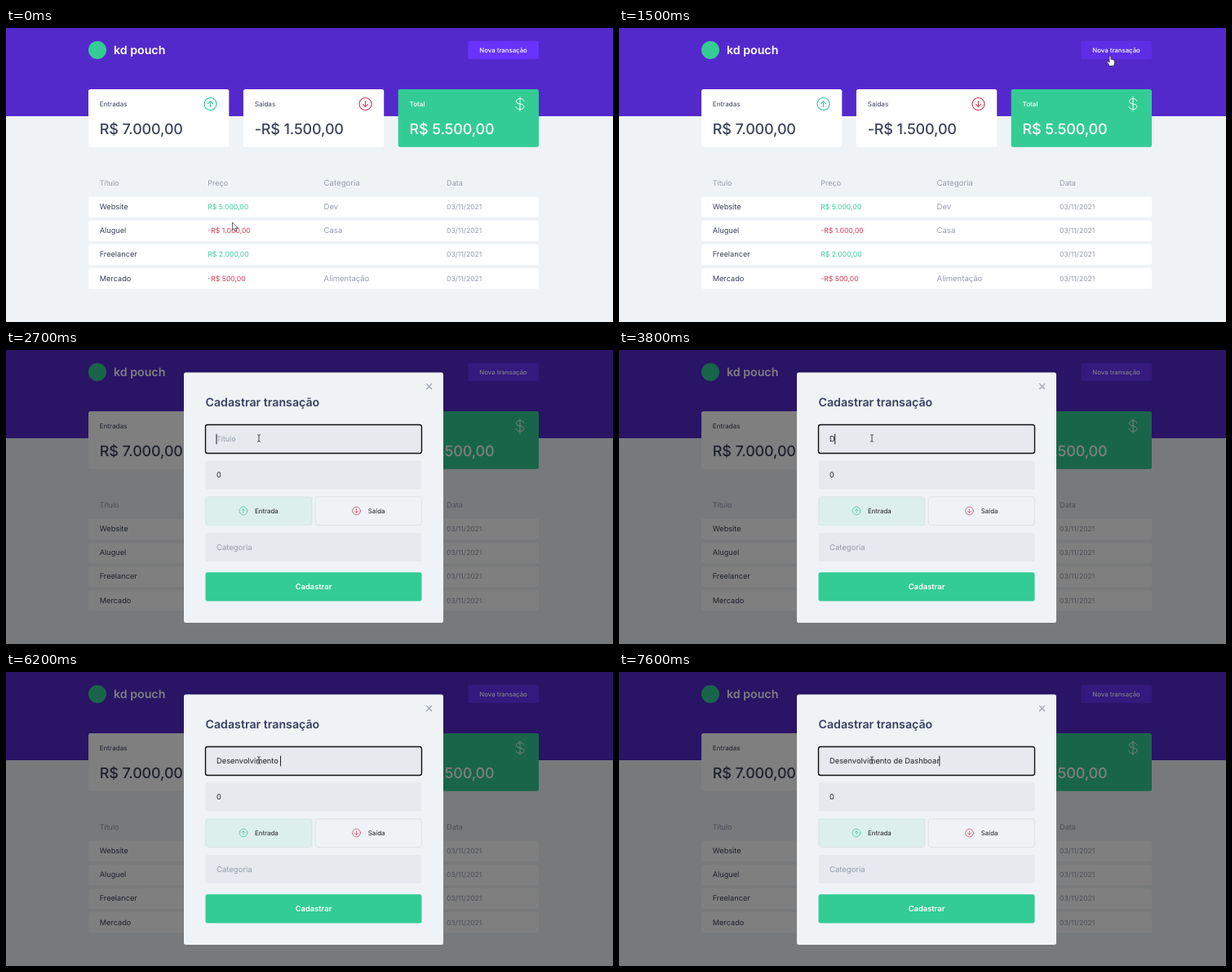
An HTML page that plays this animation: 744 px wide and 360 px high, repeating every 8 s.

```html
<!DOCTYPE html>
<html lang="pt-BR">
<head>
<meta charset="utf-8">
<title>Transações</title>
<style>
  html, body { margin: 0; width: 100%; height: 100%; overflow: hidden; }
  svg { display: block; width: 744px; height: 360px; }
  text { font-family: Inter, "Open Sans", sans-serif; white-space: pre; text-rendering: geometricPrecision; }
</style>
</head>
<body>
<svg id="stage" viewBox="0 0 744 360"></svg>
<script>
const LOOP = 8000;
const WHITE = '#fff', PAGE = '#eff3f6', PURPLE = '#5429cc', GREEN = '#33cc95', RED = '#d33a58',
      DARK = '#3c4257', TITLE = '#363f5f', MUTED = '#969cab', FIELD = '#e7e9ee', INK = '#1c1d22';

const box = (x, y, w, h, fill, extra = '') =>
  `<rect x="${x}" y="${y}" width="${w}" height="${h}" rx="2.5" fill="${fill}" ${extra}/>`;
const text = (x, y, size, fill, str, weight = 400, extra = '') =>
  `<text x="${x}" y="${y}" font-size="${size}" fill="${fill}" font-weight="${weight}" ${extra}>${str}</text>`;
const centered = 'text-anchor="middle"';

// Arrow in a ring, pointing up or down
const arrow = (x, y, scale, up) =>
  `<g transform="translate(${x} ${y}) scale(${scale} ${up ? scale : -scale})" fill="none"
      stroke="${up ? GREEN : RED}" stroke-width="1.5" stroke-linecap="round" stroke-linejoin="round">
    <circle r="10"/><path d="M0 4.5V-4.5M-4 -.5L0 -4.5L4 -.5"/></g>`;

const dollar = `<path transform="translate(630 93)" fill="none" stroke="${WHITE}" stroke-linecap="round"
  d="M0 -8.5V8.5M4.8 -3.6C4.2 -7.6 -4.6 -7.4 -4.6 -3.3C-4.6 1 4.9 -1 4.9 3.3C4.9 7.5 -4.4 7.7 -4.9 3.5"/>`;

function card(x, label, value, fill, color, icon) {
  return box(x, 75, 172.3, 70.8, fill) + icon +
    text(x + 13.8, 95.8, 8.1, color, label, fill === GREEN ? 500 : 400) +
    text(x + 13.8, 130, 18, color, value, 500, 'letter-spacing="-.15"');
}

function row(y, title, price, category) {
  return box(101, y - 15.5, 552, 25.2, WHITE) +
    text(114.7, y, 9.2, DARK, title) +
    text(247.3, y, 8.65, price[0] === '-' ? RED : GREEN, price) +
    text(389.6, y, 9.5, MUTED, category) +
    text(540, y, 8.6, MUTED, '03/11/2021');
}

const page = `
  <rect width="744" height="360" fill="${PAGE}"/>
  <rect width="744" height="108" fill="${PURPLE}"/>
  <circle cx="112" cy="27" r="11" fill="${GREEN}"/>
  ${text(132, 31.8, 14.2, WHITE, 'kd pouch', 600)}
  ${box(566.3, 16, 86.7, 22, '#6933ff', 'id="newButton"')}
  ${text(609.6, 29.8, 7.8, WHITE, 'Nova transação', 500, centered)}
  ${card(101, 'Entradas', 'R$ 7.000,00', WHITE, DARK, arrow(250.5, 93, .75, true))}
  ${card(290.9, 'Saídas', '-R$ 1.500,00', WHITE, DARK, arrow(440.5, 93, .75, false))}
  ${card(480.7, 'Total', 'R$ 5.500,00', GREEN, WHITE, dollar)}
  ${text(114.7, 193, 9, MUTED, 'Título')}
  ${text(247.3, 193, 9, MUTED, 'Preço')}
  ${text(389.6, 193, 9.6, MUTED, 'Categoria')}
  ${text(540, 193, 9.2, MUTED, 'Data')}
  ${row(222, 'Website', 'R$ 5.000,00', 'Dev')}
  ${row(251.2, 'Aluguel', '-R$ 1.000,00', 'Casa')}
  ${row(280.4, 'Freelancer', 'R$ 2.000,00', '')}
  ${row(309.6, 'Mercado', '-R$ 500,00', 'Alimentação')}`;

const modal = `<g id="modal">
  <rect width="744" height="360" fill="#000" opacity=".5"/>
  ${box(218, 27.5, 318, 306.5, PAGE)}
  <path d="M515.2 41.2l6.8 6.8m0 -6.8l-6.8 6.8" stroke="${MUTED}" stroke-width="1.1"/>
  ${text(244.5, 68.6, 14.2, TITLE, 'Cadastrar transação', 600)}
  ${box(244.5, 91.5, 265, 35, FIELD, 'id="field" stroke-width="1.4"')}
  ${text(258, 112.3, 8.9, MUTED, 'Título', 400, 'id="placeholder"')}
  ${text(258, 112.3, 9.32, INK, '', 400, 'id="typed"')}
  <rect id="caret" y="102.7" width="1" height="12.6" fill="${INK}"/>
  ${box(244.5, 135.5, 265, 35, FIELD)}
  ${text(258, 156.3, 9.2, INK, '0')}
  ${box(244.8, 179.8, 130, 34.6, '#ddefec', 'stroke="#cfdcdc" stroke-width=".6"')}
  ${box(379.3, 179.8, 130, 34.6, PAGE, 'stroke="#d3d5d9" stroke-width=".6"')}
  ${arrow(291, 197, .49, true)}
  ${text(305, 199.8, 7.95, INK, 'Entrada')}
  ${arrow(429.5, 197, .49, false)}
  ${text(443.8, 199.8, 7.9, INK, 'Saída')}
  ${box(244.5, 224, 265, 35, FIELD)}
  ${text(258, 244.8, 9.5, MUTED, 'Categoria')}
  ${box(244.5, 272.3, 265, 35.2, GREEN)}
  ${text(377, 293.2, 9.4, WHITE, 'Cadastrar', 600, centered)}
</g>`;

// Each pointer shape has its hot spot at 0,0
const pointers = `<g id="pointer" stroke-linejoin="round">
  <path id="arrowPointer" d="M0 0V9.6L2.2 7.6L3.7 11L5.3 10.3L3.9 7H6.8Z" fill="#fff" stroke="#222" stroke-width=".7"/>
  <path id="handPointer" fill="#fff" stroke="#222" stroke-width=".7"
    d="M-1 .8Q0 -.8 1 .8V4.4Q2 3.8 2.6 4.8Q3.6 4.3 4.1 5.3Q5.4 5 5.4 6.4V9Q5.3 10.8 4.2 12.6H-.9Q-1.3 10.8 -3.8 7.8Q-3.4 6.1 -1.9 7.3L-1 8.2Z"/>
  <path id="textPointer" fill="none" stroke="#333" stroke-width=".9"
    d="M-1.9 -4.3Q0 -4.3 0 -3.3Q0 -4.3 1.9 -4.3M0 -3.3V3.3M-1.9 4.3Q0 4.3 0 3.3Q0 4.3 1.9 4.3"/>
</g>`;

const $ = id => document.getElementById(id);
$('stage').innerHTML = page + modal + pointers;

const show = (id, visible) => $(id).setAttribute('display', visible ? 'inline' : 'none');

// [time, x, y]
const route = [
  [0, 277.5, 238], [200, 280, 236], [300, 280, 236], [600, 360, 185], [900, 500, 102], [1200, 600, 47],
  [1300, 602, 37], [1500, 602, 34], [1700, 602, 34], [1800, 601, 33], [2000, 601, 33],
  [2300, 458, 46], [2600, 312, 106], [2700, 310, 108], [LOOP, 310, 108]
];
function pointerAt(t) {
  const i = route.findIndex(key => key[0] > t);
  const [t0, x0, y0] = route[i - 1], [t1, x1, y1] = route[i];
  const p = (t - t0) / (t1 - t0);
  return [x0 + (x1 - x0) * p, y0 + (y1 - y0) * p];
}

const phrase = 'Desenvolvimento de Dashboar';
const keyTimes = [
  3800, 4100, 4300, 4500, 4600, 4800, 4800, 5000, 5300, 5400, 5600, 5700, 5800, 5900, 6000,
  6200, 6300, 6400, 6400, 6600, 6800, 6900, 7100, 7200, 7300, 7500, 7600
];

function draw(t) {
  const open = t >= 1800, focused = t >= 2700;
  const hover = t < 1300 || t >= 2100 ? 0 : Math.min(1, (t - 1200) / 300);
  $('newButton').style.filter = `brightness(${1 - .1 * hover})`;
  show('modal', open);

  const typed = phrase.slice(0, keyTimes.filter(k => k <= t).length);
  $('typed').textContent = typed;
  show('placeholder', !typed);
  $('field').setAttribute('stroke', focused ? '#101010' : 'none');
  show('caret', focused && (t < 3200 || t >= 3700));
  $('caret').setAttribute('x', 257.5 + (typed ? $('typed').getComputedTextLength() : 0));

  const [x, y] = pointerAt(t);
  $('pointer').setAttribute('transform', `translate(${x} ${y})`);
  const overField = open && y > 91;
  const overButton = !open && t >= 1300;
  show('textPointer', overField);
  show('handPointer', overButton);
  show('arrowPointer', !overField && !overButton);
}

const start = performance.now();
function tick() {
  draw(Math.floor((performance.now() - start) % LOOP / 100) * 100);
  requestAnimationFrame(tick);
}
tick();
</script>
</body>
</html>
```
